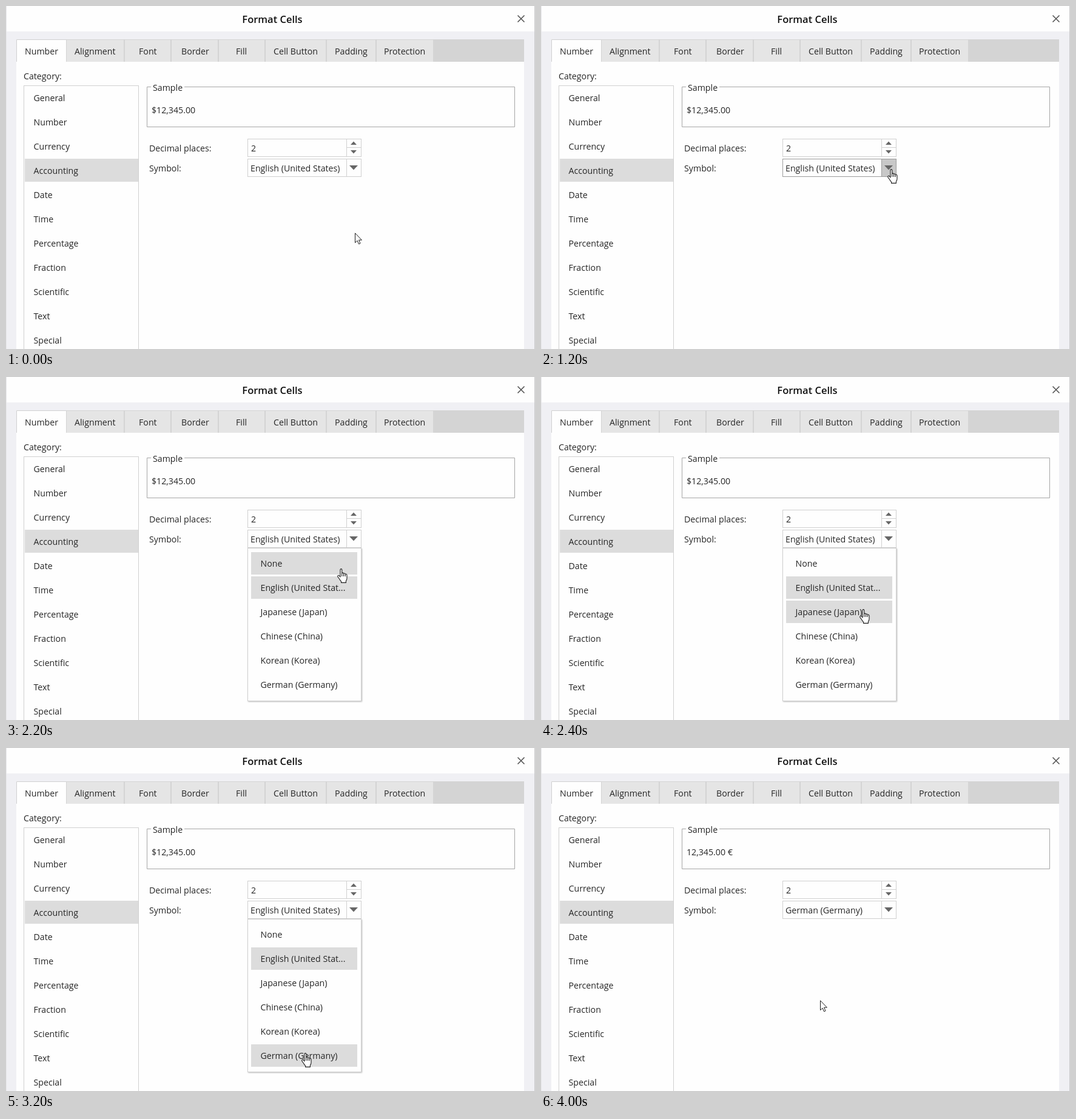
These frames come from a looping animation (872x566 px, 4200 ms). An HTML page:

```html
<!DOCTYPE html>
<html lang="en">
<head>
<meta charset="utf-8">
<title>Format Cells</title>
<style>
  html, body { margin: 0; width: 100%; height: 100%; overflow: hidden; background: #f0f0f4; }
  svg { display: block; width: 872px; height: 566px; }
  text { font: 14.2px "Open Sans", "Noto Sans", sans-serif; fill: #262626; white-space: pre; }
  .title { font-size: 16.5px; font-weight: 600; fill: #111; text-anchor: middle; }
  .box { fill: #fefefe; stroke: #d0d0d0; }
  .line { fill: none; stroke: #d0d0d0; }
  .mark { fill: #666; }
  .selected { fill: #dcdcdc; }
  .cursor { fill: #fff; stroke: #1c1c1c; stroke-linejoin: round; }
</style>
</head>
<body>
<svg id="stage" viewBox="0 0 872 566">
  <rect width="872" height="566" fill="#f0f0f4"/>
  <rect width="872" height="42" fill="#fefefe"/>
  <path d="M.5 0V566" stroke="#e6e6e9"/>
  <path d="M871.5 0V566" stroke="#c9c9cb"/>
  <text class="title" x="439" y="28">Format Cells</text>
  <path d="M843.5 15.5l11 11m0-11l-11 11" stroke="#555" stroke-width="1.6"/>

  <rect x="17" y="55" width="837" height="511" fill="#fefefe"/>
  <rect x="99" y="55" width="755" height="37" fill="#d4d4d4"/>
  <path class="line" d="M17.5 92V55.5H99"/>
  <g id="tabs"></g>

  <text x="29" y="121">Category:</text>
  <rect class="box" x="29.5" y="131.5" width="189" height="450"/>
  <rect class="selected" x="31" y="252" width="187" height="38"/>
  <g id="categories"></g>

  <path d="M239 133.5H232.5V199.5H838.5V133.5H294" fill="none" stroke="#a6a6a6"/>
  <text x="242" y="140">Sample</text>
  <text id="sample" x="240" y="177"></text>

  <text x="236" y="240">Decimal places:</text>
  <rect class="box" x="398.5" y="219.5" width="187" height="29"/>
  <path class="line" d="M561.5 220V248M562 233.5H585"/>
  <path class="mark" d="M568 229l5-5.5 5 5.5zM568 238h10l-5 5.5z"/>
  <text x="404" y="240">2</text>

  <text x="236" y="273">Symbol:</text>
  <rect class="box" id="combo" x="398.5" y="252.5" width="187" height="29"/>
  <rect id="comboButton" x="562" y="253" width="23" height="28"/>
  <path class="line" id="comboDivider" d="M561.5 253V281"/>
  <path class="mark" d="M566 263h14l-7 7.5z"/>
  <text id="symbol" x="403" y="273"></text>

  <g id="popup">
    <rect class="box" x="398.5" y="282.5" width="187" height="252" style="filter: drop-shadow(1px 1px 1px #0004)"/>
    <rect class="selected" x="404" y="329" width="175" height="37"/>
    <rect class="selected" id="hover" x="404" width="175" height="37"/>
    <g id="options"></g>
  </g>

  <path class="cursor" id="arrow" d="M.5 .8V16.6L4.1 13.2 6.5 18.8 9 17.8 6.6 12.2H11.4z"/>
  <path class="cursor" id="hand" stroke-width="1.1" d="M5 14V2.4Q5 .6 6.4 .6T7.8 2.4V8Q8.2 7 9.3 7.1T10.6 8.6Q11 7.8 12 8T13.3 9.5Q13.8 8.8 14.8 9.2T16 11V16Q16 18.5 14.4 20.5V23.4H6.6V21.4Q4.6 19.3 3.4 17L.9 13.6Q.2 12 1.4 11.4T3.6 12.2zM7.8 8V13M10.6 9V13M13.3 10V13"/>
</svg>
<script>
const byId = id => document.getElementById(id);

function add(parent, tag, attributes, content = "") {
  const node = document.createElementNS("http://www.w3.org/2000/svg", tag);
  for (const name in attributes) node.setAttribute(name, attributes[name]);
  node.textContent = content;
  byId(parent).append(node);
}

// Label, left edge, right edge and text position
[
  ["Number", 17, 99, 31], ["Alignment", 99, 195, 113], ["Font", 195, 272, 219],
  ["Border", 272, 350, 289], ["Fill", 350, 427, 379], ["Cell Button", 427, 528, 441],
  ["Padding", 528, 610, 542], ["Protection", 610, 705, 623]
].forEach(([label, left, right, x], i) => {
  if (i) add("tabs", "rect", { x: left + 1, y: 56, width: right - left - 2, height: 36, fill: "#e5e5e5" });
  add("tabs", "text", { x, y: 80 }, label);
});

function addList(parent, x, y, labels) {
  labels.forEach((label, i) => add(parent, "text", { x, y: y + 40 * i }, label));
}
addList("categories", 45.5, 157, ["General", "Number", "Currency", "Accounting", "Date", "Time",
  "Percentage", "Fraction", "Scientific", "Text", "Special"]);
addList("options", 419.5, 313, ["None", "English (United Stat...", "Japanese (Japan)",
  "Chinese (China)", "Korean (Korea)", "German (Germany)"]);

const LOOP = 4200, OPEN = 1600, CLOSE = 3600;

// Start time, pointer shape, x, y
const pointerSteps = [
  [0, "arrow", 575, 374], [400, "arrow", 574, 373], [600, "arrow", 565, 327],
  [800, "hand", 570, 274], [1000, "hand", 571, 269], [2000, "hand", 574, 279],
  [2200, "hand", 546, 316], [2400, "hand", 525, 383], [2600, "hand", 500, 442],
  [2800, "hand", 491, 478], [3000, "hand", 488, 500], [3200, "hand", 487, 503],
  [3600, "arrow", 488, 501], [3800, "arrow", 482, 476], [4000, "arrow", 460, 416]
];

const show = (id, visible) => byId(id).setAttribute("visibility", visible ? "visible" : "hidden");

function draw(time) {
  const [, shape, x, y] = pointerSteps.findLast(step => step[0] <= time);
  for (const id of ["arrow", "hand"]) {
    show(id, id === shape);
    byId(id).setAttribute("transform", `translate(${x} ${y})`);
  }

  const comboHovered = shape === "hand" && y < 282;
  byId("combo").style.stroke = comboHovered ? "#9c9c9c" : "";
  byId("comboDivider").style.stroke = comboHovered ? "#9c9c9c" : "";
  byId("comboButton").setAttribute("fill", comboHovered ? "#c8c8c8" : "#fefefe");

  const open = time >= OPEN && time < CLOSE;
  byId("popup").setAttribute("display", open ? "inline" : "none");
  const row = Math.floor((y - 287) / 40);
  byId("hover").setAttribute("y", 289 + 40 * row);
  show("hover", open && !comboHovered);

  const german = time >= CLOSE;
  byId("sample").textContent = german ? "12,345.00 €" : "$12,345.00";
  byId("symbol").textContent = german ? "German (Germany)" : "English (United States)";
}

function tick() {
  draw(performance.now() % LOOP);
  requestAnimationFrame(tick);
}
tick();
</script>
</body>
</html>
```
